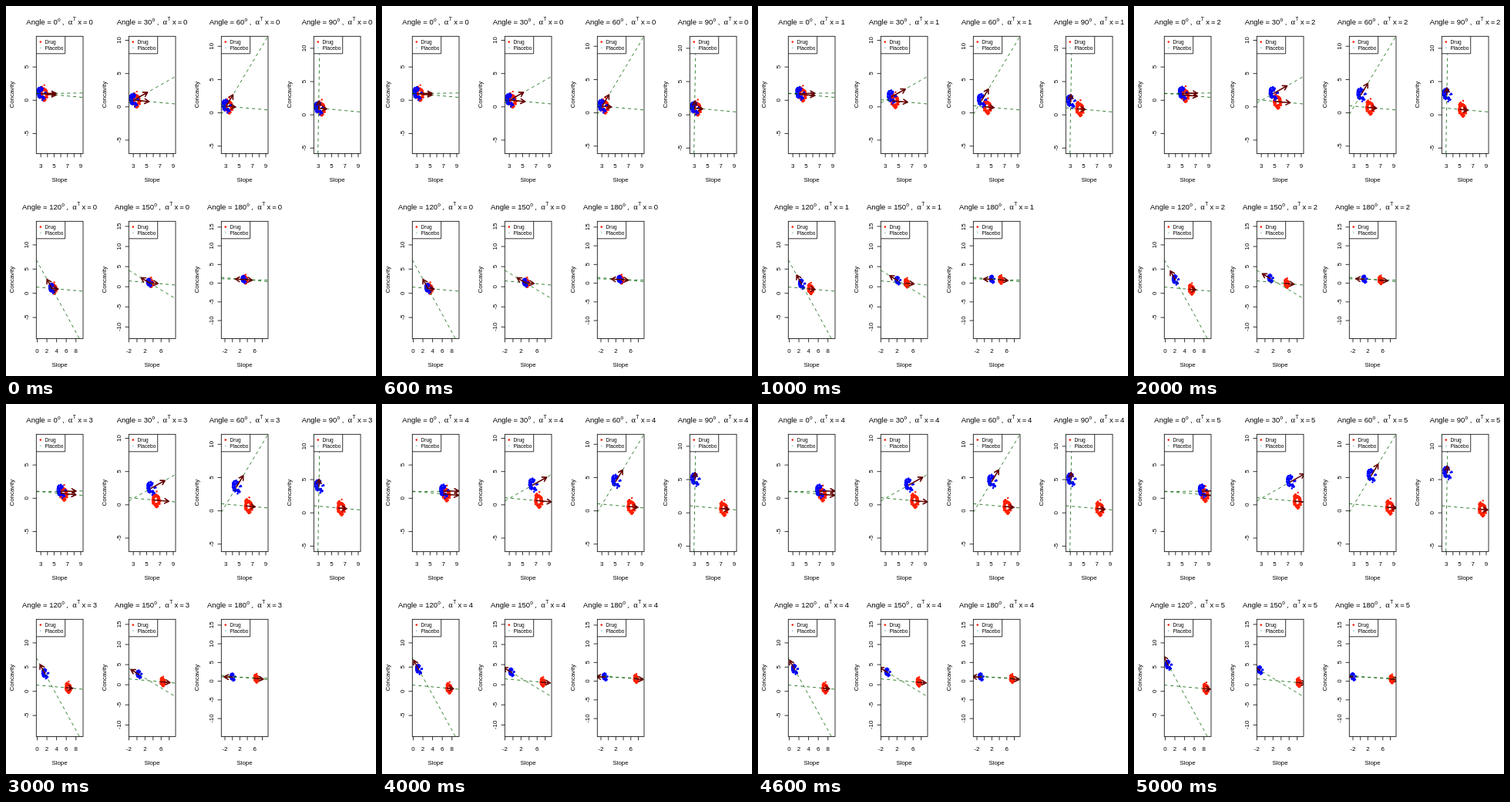
Recreate the animation shown at these times as an HTML page with a canvas. Size 480 by 480 pixels, loop 6 s.

```html
<!DOCTYPE html>
<html lang="en">
<head>
<meta charset="utf-8">
<title>Slope and concavity by angle</title>
<style>
html, body { margin: 0; width: 100%; height: 100%; overflow: hidden; background: #fff; }
canvas { display: block; width: 480px; height: 480px; }
</style>
</head>
<body>
<canvas id="stage"></canvas>
<script>
const canvas = document.getElementById('stage');
const ctx = canvas.getContext('2d');
const dpr = window.devicePixelRatio || 1;
canvas.width = canvas.height = 480 * dpr;

const SANS = '"Liberation Sans", Arial, sans-serif';
const SERIF = '"Liberation Serif", serif';
const RED = '#ff2000', BLUE = '#0000ff', MAROON = '#640000', GREEN = '#006400';
const BOX = { l: 39.3, t: 39.3, r: 100, b: 191.5 };
const BASE = { x: 3.05, y: 1 };
const DRUG_SLOPE = -0.09;
const STEP = 1000, STEPS = 6;

const range = (from, to, by) => {
  const out = [];
  for (let v = from; v <= to; v += by) out.push(v);
  return out;
};

// ox, oy: pixel of the data origin inside the cell; k: pixels per unit
const top4 = { row: 0, ox: 19.3, k: 8.63, xt: range(3, 9, 1), xl: [3, 5, 7, 9] };
const wide = { row: 1, xt: range(-2, 8, 2), xl: [-2, 2, 6] };
const panels = [
  { ...top4, deg: 0, dir: 0.9, oy: 122.3, yt: range(-5, 5, 5), drugLen: 2.25, placLen: 2.25 },
  { ...top4, deg: 30, dir: 29.5, oy: 130.8, yt: range(-5, 10, 5), drugLen: 2.3, placLen: 2.4 },
  { ...top4, deg: 60, dir: 59.1, oy: 138.6, yt: range(-5, 10, 5), drugLen: 1.4, placLen: 2 },
  { ...top4, deg: 90, dir: 89.1, oy: 141.2, yt: range(-5, 10, 5), drugLen: 1.2, placLen: 1.05 },
  { row: 1, deg: 120, dir: 118.7, ox: 40.5, oy: 132.7, k: 6.28, xt: range(0, 8, 2),
    xl: range(0, 8, 2), yt: range(-5, 10, 5), drugLen: 1.3, placLen: 2.15 },
  { ...wide, deg: 150, dir: 148.8, ox: 49.9, oy: 124.2, k: 5.22, yt: range(-10, 15, 5),
    drugLen: 2.2, placLen: 2.35 },
  { ...wide, deg: 180, dir: 178.3, ox: 53.7, oy: 119.6, k: 4.85, yt: range(-10, 15, 5),
    drugLen: 2.27, placLen: 2.27 }
];

function seeded(seed) {
  return () => {
    seed = (seed * 1664525 + 1013904223) >>> 0;
    return seed / 4294967296;
  };
}

// Part of an oval ring between two angles (in half turns), leaning to the lower right
function cloud({ seed, count, cx, cy, rx, ry, from, to, inner }) {
  const rnd = seeded(seed);
  return Array.from({ length: count }, () => {
    const a = (from + (to - from) * rnd()) * Math.PI;
    const r = inner + (1 - inner) * rnd();
    const u = Math.cos(a) * r, v = Math.sin(a) * r;
    return [cx + rx * (u - 0.2 * v), cy + ry * v];
  });
}
const drugPts = cloud({ seed: 11, count: 105, cx: 0.38, cy: -0.05, rx: 0.68, ry: 1.1,
  from: 0, to: 2, inner: 0.45 }).concat([[0.48, 1.28]]);
const placPts = cloud({ seed: 29, count: 62, cx: 0.07, cy: 0, rx: 0.68, ry: 1.02,
  from: 0.3, to: 1.75, inner: 0.4 }).concat([[0.65, 0.2], [0.72, 0.1], [0.5, 0.05]]);

function line(x1, y1, x2, y2) {
  ctx.beginPath();
  ctx.moveTo(x1, y1);
  ctx.lineTo(x2, y2);
  ctx.stroke();
}

function dot(x, y, r, color) {
  ctx.fillStyle = color;
  ctx.beginPath();
  ctx.arc(x, y, r, 0, 2 * Math.PI);
  ctx.fill();
}

function label(text, x, y, size, align = 'center') {
  ctx.fillStyle = '#000';
  ctx.font = `${size}px ${SANS}`;
  ctx.textAlign = align;
  ctx.fillText(text, x, y);
}

function sideLabel(text, x, y, size) {
  ctx.save();
  ctx.translate(x, y);
  ctx.rotate(-Math.PI / 2);
  label(text, 0, 0, size);
  ctx.restore();
}

function title(deg, step) {
  const big = `9.5px ${SANS}`, small = `6.65px ${SANS}`;
  // text, font, rise, gap after
  const runs = [
    [`Angle = ${deg}`, big, 0, 0.2],
    ['o', small, 4, 2.4],
    [',', big, 0, 5.2],
    ['\u03b1', `10.5px ${SERIF}`, 0, 0.5],
    ['T', small, 4.8, 2.4],
    ['x', big, 0, 2],
    ['=', big, 0, 1.8],
    [String(step), big, 0, 0]
  ];
  const widths = runs.map(([text, font, , gap]) => {
    ctx.font = font;
    return ctx.measureText(text).width + gap;
  });
  let x = 69.5 - widths.reduce((a, b) => a + b) / 2;
  ctx.textAlign = 'left';
  ctx.fillStyle = '#000';
  runs.forEach(([text, font, rise], i) => {
    ctx.font = font;
    ctx.fillText(text, x, 24 - rise);
    x += widths[i];
  });
}

function arrow(x, y, dx, dy, len) {
  const tx = x + dx * len, ty = y + dy * len;
  const a = Math.atan2(dy, dx), head = 6.2;
  ctx.beginPath();
  ctx.moveTo(x, y);
  ctx.lineTo(tx, ty);
  for (const side of [-1, 1]) {
    const b = a + Math.PI + side * Math.PI / 6;
    ctx.moveTo(tx, ty);
    ctx.lineTo(tx + head * Math.cos(b), ty + head * Math.sin(b));
  }
  ctx.stroke();
}

// Line across the box; dashes start where it enters from the left or the floor
function guide(x, y, dx, dy) {
  if (dx < 0) [dx, dy] = [-dx, -dy];
  const toLeft = (x - BOX.l) / dx;
  const toFloor = dy < 0 ? (y - BOX.b) / dy : Infinity;
  const back = Math.min(toLeft, toFloor);
  line(x - dx * back, y - dy * back, x + dx * 250, y + dy * 250);
}

function drawData(p, step) {
  const bx = p.ox + BASE.x * p.k, by = p.oy - BASE.y * p.k;
  const a = p.dir * Math.PI / 180;
  const n = Math.hypot(1, DRUG_SLOPE);
  const groups = [
    { pts: drugPts, color: RED, dx: 1 / n, dy: -DRUG_SLOPE / n, len: p.drugLen },
    { pts: placPts, color: BLUE, dx: Math.cos(a), dy: -Math.sin(a), len: p.placLen }
  ];

  ctx.save();
  ctx.beginPath();
  ctx.rect(BOX.l, BOX.t, BOX.r - BOX.l, BOX.b - BOX.t);
  ctx.clip();

  for (const g of groups) {
    g.x = bx + g.dx * step * p.k;
    g.y = by + g.dy * step * p.k;
    for (const [u, v] of g.pts) dot(g.x + u * p.k, g.y - v * p.k, 1.2, g.color);
  }

  ctx.strokeStyle = GREEN;
  ctx.lineWidth = 0.8;
  ctx.setLineDash([4, 4]);
  for (const g of groups) guide(bx, by, g.dx, g.dy);

  ctx.setLineDash([]);
  ctx.strokeStyle = MAROON;
  ctx.lineWidth = 1.6;
  ctx.lineCap = ctx.lineJoin = 'round';
  for (const g of groups) arrow(g.x, g.y, g.dx, g.dy, g.len * p.k);
  ctx.restore();
}

function drawAxes(p) {
  for (const v of p.xt) {
    const x = p.ox + v * p.k;
    line(x, BOX.b, x, BOX.b + 4.75);
  }
  for (const v of p.xl) label(v, p.ox + v * p.k, 209.8, 7.92);
  for (const v of p.yt) {
    const y = p.oy - v * p.k;
    line(BOX.l - 4.75, y, BOX.l, y);
    sideLabel(v, 29.2, y, 7.92);
  }
  label('Slope', 69.5, 228, 7.92);
  sideLabel('Concavity', 9.5, 115.2, 7.92);
}

function drawLegend() {
  const w = 37.4, h = 22.5;
  ctx.fillStyle = '#fff';
  ctx.fillRect(BOX.l, BOX.t, w, h);
  ctx.beginPath();
  ctx.moveTo(BOX.l, BOX.t + h);
  ctx.lineTo(BOX.l + w, BOX.t + h);
  ctx.lineTo(BOX.l + w, BOX.t);
  ctx.stroke();
  dot(44.8, 46.6, 1.3, RED);
  dot(44.8, 54.3, 0.9, '#9cc4c4');
  label('Drug', 50.5, 48.9, 6.6, 'left');
  label('Placebo', 50.5, 56.5, 6.6, 'left');
}

function draw(step) {
  ctx.setTransform(dpr, 0, 0, dpr, 0, 0);
  ctx.fillStyle = '#fff';
  ctx.fillRect(0, 0, 480, 480);
  panels.forEach((p, i) => {
    ctx.save();
    ctx.translate((i % 4) * 120, p.row * 240);
    drawData(p, step);
    ctx.strokeStyle = '#000';
    ctx.lineWidth = 0.8;
    drawLegend();
    ctx.strokeRect(BOX.l, BOX.t, BOX.r - BOX.l, BOX.b - BOX.t);
    drawAxes(p);
    title(p.deg, step);
    ctx.restore();
  });
}

const start = performance.now();
let shown = -1;
function tick() {
  const step = Math.floor((performance.now() - start) / STEP) % STEPS;
  if (step !== shown) draw(shown = step);
  requestAnimationFrame(tick);
}
tick();
</script>
</body>
</html>
```
